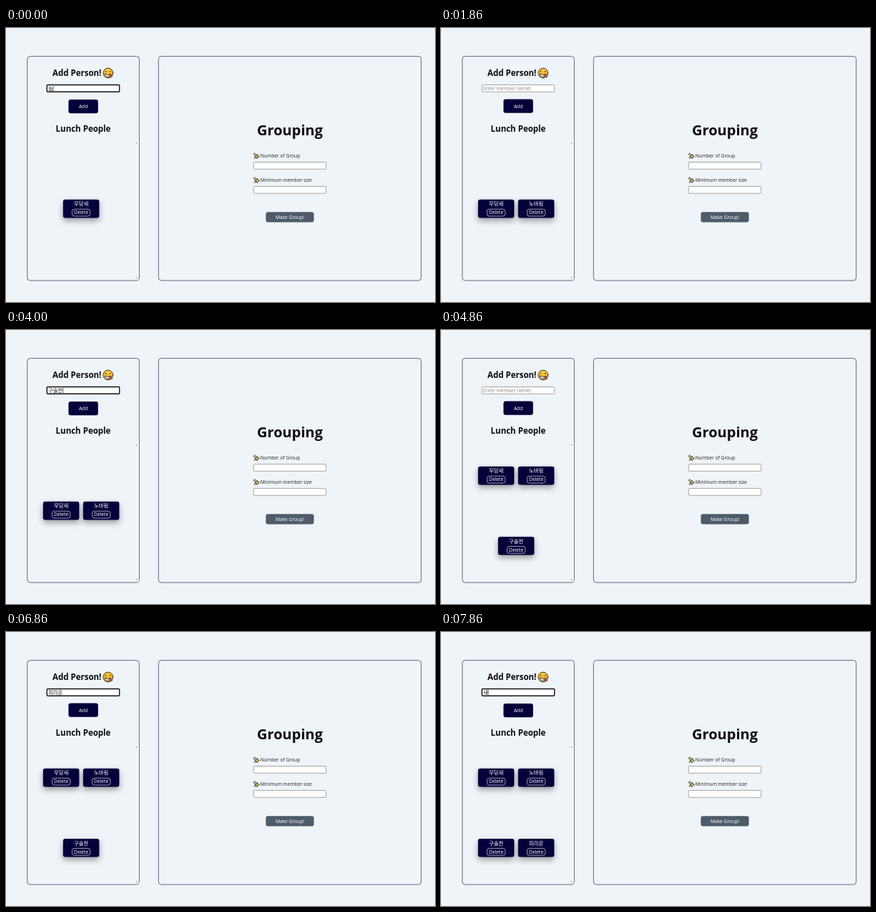
Write an HTML page that moves like this. It is 600 by 383 pixels and loops after 8000 ms.

```html
<!DOCTYPE html>
<html lang="ko">
<head>
<meta charset="utf-8">
<title>Grouping</title>
<style>
  html, body { margin: 0; width: 100%; height: 100%; overflow: hidden; background: #eff4f8; }
  svg { display: block; width: 100%; height: 100%; }
  text { font: 6.7px "Open Sans", "Noto Sans CJK KR", "Noto Sans CJK", sans-serif; fill: #222; white-space: pre; }
  text.mid { text-anchor: middle; }
  text.light { fill: #fff; }
  text.h2 { font-size: 11.5px; font-weight: 700; fill: #0b0b0f; }
  text.h1 { font-size: 20px; font-weight: 700; fill: #0b0b0f; }
  .panel { fill: none; stroke: #43455f; stroke-width: .8; }
  .input { fill: #fff; stroke: #808080; stroke-width: .7; }
  .navy { fill: #04023a; }
  .shadow { filter: drop-shadow(0 4px 4px rgba(0, 0, 0, .36)); }
</style>
</head>
<body>
<svg viewBox="0 0 600 383">
  <defs>
    <path id="star" d="M0-3Q.5-.5 3 0Q.5 .5 0 3Q-.5 .5-3 0Q-.5-.5 0-3Z" fill="#e8cf58" stroke="#25282c" stroke-width=".9"/>
    <g id="sparkles">
      <use href="#star" x="5.4" y="5.2" transform="scale(1.05)"/>
      <use href="#star" transform="translate(2.2 2.5) scale(.65)"/>
      <use href="#star" transform="translate(2.6 7.6) scale(.5)"/>
    </g>
  </defs>

  <rect class="panel" x="29.8" y="39.6" width="156.6" height="313.4" rx="4"/>
  <rect class="panel" x="213.3" y="39.6" width="367.4" height="313.4" rx="4"/>

  <text class="h2" x="65" y="67">Add Person!</text>
  <g stroke="#292319" stroke-width=".9" stroke-linecap="round">
    <circle cx="142.8" cy="63" r="6.9" fill="#fbc53b"/>
    <path d="M138.4 61.2q1.2-1.6 2.4 0M144.6 61.2q1.2-1.6 2.4 0" fill="none"/>
    <path d="M138.4 64.4q4.4 1.4 8.8 0q-.8 4-4.4 4t-4.4-4Z" fill="#fff"/>
    <path d="M143.6 66.3l3.2-1.2q2.6 1.7 1.6 3.4q-2 1.2-4.8-2.2Z" fill="#e25d52" stroke-width=".6"/>
  </g>

  <rect id="field" class="input" x="57.3" y="79.5" width="101.4" height="9.8" rx="1"/>
  <text id="typed" x="59" y="86.9"></text>
  <path id="caret" d="M0 80.8v7.2" stroke="#000" stroke-width=".6"/>

  <g id="add">
    <rect class="navy" x="87.4" y="100" width="41.4" height="19.3" rx="3"/>
    <text class="mid light" x="108.1" y="112.2">Add</text>
  </g>
  <text class="h2 mid" x="108" y="144.8">Lunch People</text>

  <rect x="180" y="156.5" width="5.4" height="195.5" fill="#f3f4f6"/>
  <path d="M181.2 161.3l1.3-1.5 1.3 1.5ZM181.2 348.3l1.3 1.5 1.3-1.5Z" fill="#8a8383"/>
  <g id="cards"></g>

  <text class="h1 mid" x="397" y="149.8">Grouping</text>
  <use href="#sparkles" x="345.6" y="174"/>
  <text x="355.8" y="181.4">Number of Group</text>
  <rect class="input" x="346.3" y="187.5" width="101.4" height="9.8" rx="1"/>
  <use href="#sparkles" x="345.6" y="207.8"/>
  <text x="355.8" y="215.2">Minimum member size</text>
  <rect class="input" x="346.3" y="221.4" width="101.4" height="9.8" rx="1"/>
  <rect x="363.4" y="257.3" width="67.2" height="14.2" rx="3" fill="#4e5b68"/>
  <text class="mid light" x="397" y="266.9">Make Group!</text>
</svg>

<script>
const LOOP = 8000, STEP = 1000 / 7;
const $ = id => document.getElementById(id);
const names = ["우담새", "노바림", "구솔찬", "피라온"];

// Each burst types one syllable state per step, starting at the given step.
const bursts = [
  [0, "놉 노바 노발 노바리 노바림"],
  [19, "ㄱ 구 굿 구소 구솔 구솔ㅊ 구솔차 구솔찬"],
  [38, "ㅍ 피 필 피라 피랑 피라오 피라온"],
  [54, "ㅅ 새"]
].map(([start, keys]) => ({ start, keys: keys.split(" ") }));

// The pointer hovers Add, leaves the field, submits, and returns to the field.
const submits = [
  { hover: 4, blur: 8, add: 12, focus: 15 },
  { hover: 30, blur: 31, add: 33, focus: 36 },
  { hover: 46, blur: 49, add: 50, focus: 53 }
];

$("cards").innerHTML = names.map(name => `<g>
  <rect class="navy shadow" width="50.6" height="25.6" rx="3"/>
  <text class="mid light" x="25.3" y="8.6" style="font-size:7.4px">${name}</text>
  <rect x="12.6" y="13.4" width="25.4" height="9.8" rx="3.2" fill="none" stroke="#fff" stroke-width=".6"/>
  <text class="mid light" x="25.3" y="20.7">Delete</text></g>`).join("");
const cards = [...$("cards").children];

function layoutCards(count) {
  cards.forEach((card, i) => {
    const alone = i === count - 1 && i % 2 === 0;
    const x = alone ? 79.8 : 51.8 + 56 * (i % 2);
    const y = count < 3 ? 239.8 : 190.8 + 98.2 * (i >> 1);
    card.setAttribute("transform", `translate(${x} ${y})`);
    card.style.display = i < count ? "" : "none";
  });
}

function draw(time) {
  const step = Math.floor(time / STEP + 1e-6);
  const added = submits.filter(s => step >= s.add).length;
  const focused = !submits.some(s => step >= s.blur && step < s.focus);
  const hovering = submits.some(s => step >= s.hover && step < s.focus);

  const { start, keys } = bursts[added];
  const index = Math.min(step - start, keys.length - 1);
  const value = index < 0 ? "" : keys[index];
  const lastKey = index < 0 ? submits[added - 1].focus : start + index;

  const typed = $("typed");
  typed.textContent = value || "Enter member name!";
  typed.style.fill = value ? "#222" : "#858585";
  typed.style.fontSize = value ? "7.4px" : "6.7px";

  $("field").style.stroke = focused ? "#101018" : "";
  $("field").style.strokeWidth = focused ? 1.4 : "";
  const caretOn = focused && (step - lastKey) * STEP % 1000 < 500;
  const caretX = 59.4 + (value ? typed.getComputedTextLength() : 0);
  $("caret").setAttribute("transform", `translate(${caretX} 0)`);
  $("caret").style.display = caretOn ? "" : "none";

  $("add").setAttribute("transform", `translate(0 ${hovering ? -.5 : 0})`);
  layoutCards(added + 1);
}

function tick() {
  draw(performance.now() % LOOP);
  requestAnimationFrame(tick);
}
tick();
</script>
</body>
</html>
```
